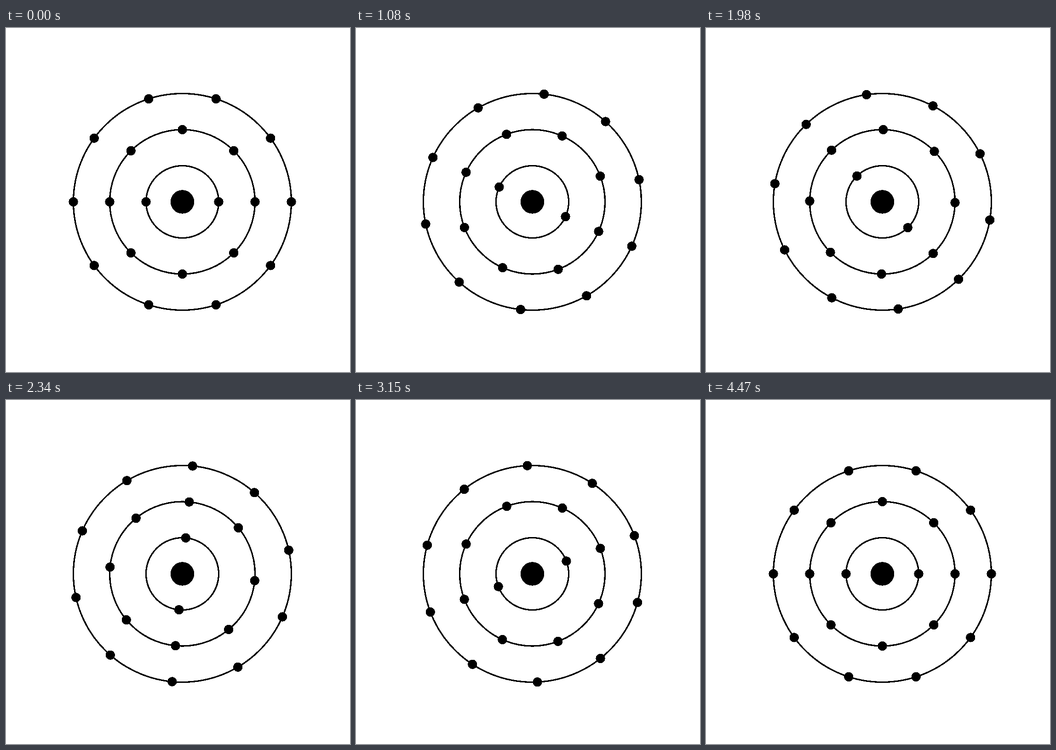
An HTML page for the animation above (4.5 s loop, 748 px wide and 748 px high).

```html
<!DOCTYPE html>
<html>
<head>
<meta charset="utf-8">
<title>Atom shells</title>
<style>
html, body { margin: 0; height: 100%; overflow: hidden; background: #fff; }
svg { display: block; width: 748px; height: 748px; }
</style>
</head>
<body>
<svg viewBox="0 0 748 748" shape-rendering="crispEdges"></svg>
<script>
const CX = 383.5, CY = 378, SHELL_X = 79, SHELL_Y = 78.5;
const STEP = 30, STEPS = 150, SPIN = 765;
const svg = document.querySelector('svg');

function ellipse(rx, ry, style) {
  const el = document.createElementNS('http://www.w3.org/2000/svg', 'ellipse');
  const attrs = { cx: CX, cy: CY, rx, ry, ...style };
  for (const name in attrs) el.setAttribute(name, attrs[name]);
  return svg.appendChild(el);
}

ellipse(25.7, 25.7);
const electrons = [];
[2, 8, 10].forEach((count, i) => {
  const rx = SHELL_X * (i + 1), ry = SHELL_Y * (i + 1);
  ellipse(rx, ry, { fill: 'none', stroke: '#000', 'stroke-width': 3.3 });
  for (let n = 0; n < count; n++) {
    electrons.push({ el: ellipse(10.2, 10.2), rx, ry, start: 360 * n / count });
  }
});

function draw() {
  const step = Math.floor(performance.now() / STEP) % STEPS;
  // The loop opens on the rest pose, then spins down to it again.
  const turn = step ? SPIN * (1 - step / STEPS) ** 3 : 0;
  for (const { el, rx, ry, start } of electrons) {
    const angle = (start + turn) * Math.PI / 180;
    el.setAttribute('cx', CX + rx * Math.cos(angle));
    el.setAttribute('cy', CY - ry * Math.sin(angle));
  }
  requestAnimationFrame(draw);
}
draw();
</script>
</body>
</html>
```
